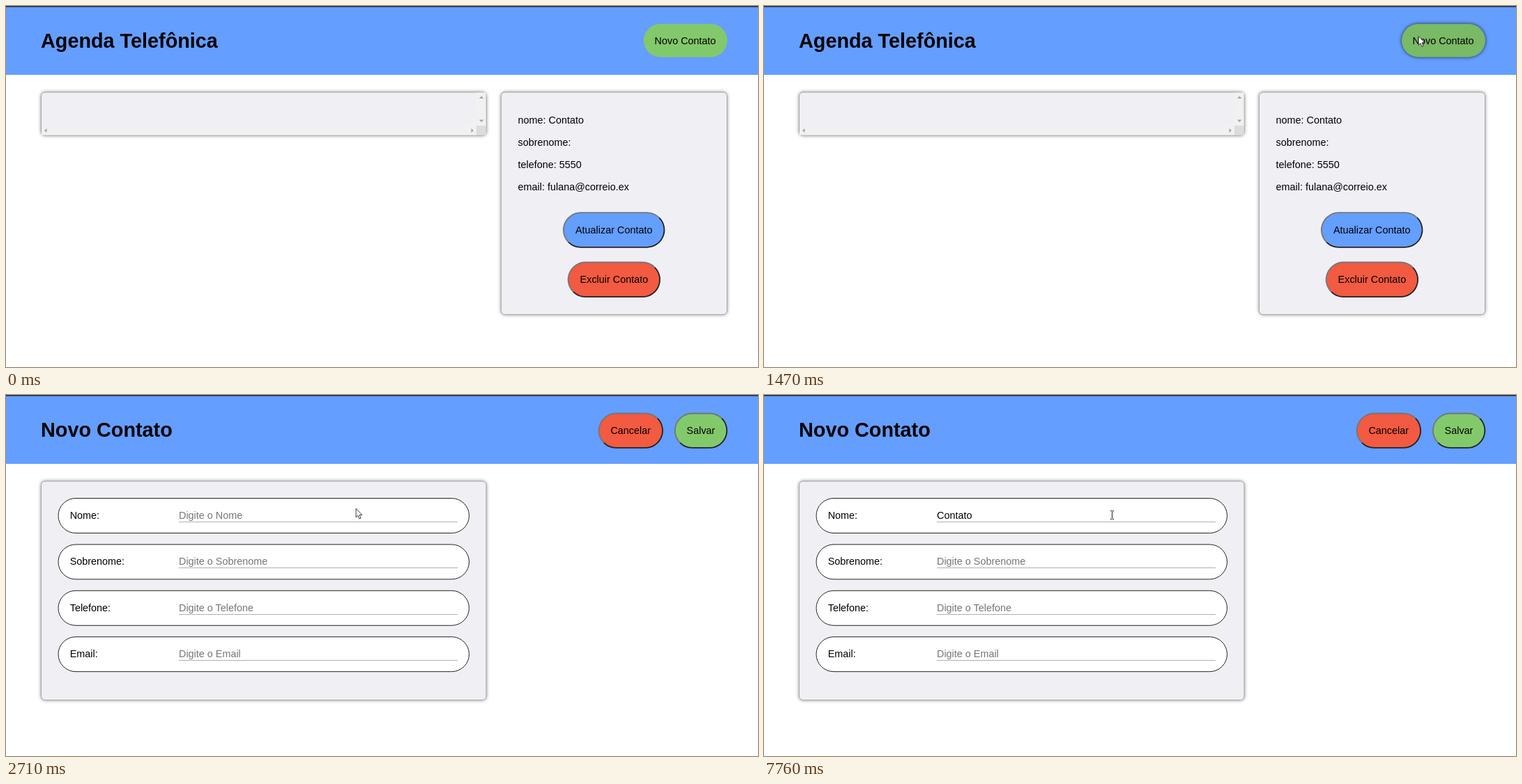
Animation of 1079x519 px, one loop 8 s. Source, as an HTML page:

```html
<!DOCTYPE html>
<html lang="pt">
<head>
<meta charset="utf-8">
<title>Agenda</title>
<style>
html, body { margin: 0; width: 100%; height: 100%; overflow: hidden; background: #fff; }
svg { display: block; width: 1079px; height: 519px; font: 14.4px "Liberation Sans", Arial, sans-serif; }
.title { font-size: 28.8px; font-weight: bold; }
.card { fill: #f0eff4; stroke: #a9a9ab; filter: drop-shadow(0 0 2.5px rgba(0, 0, 0, .45)); }
.hint { fill: #757575; }
.hover { fill: #7ab966; filter: drop-shadow(0 0 2.5px rgba(0, 0, 0, .75)); }
.status { font: 9.2px "Open Sans", "Noto Sans", sans-serif; fill: #fff; }
</style>
</head>
<body>
<svg id="stage" viewBox="0 0 1079 519"></svg>
<script>
const BLUE = '#649eff', GREEN = '#82c96c', RED = '#f25a41';
const LOOP = 8000, SWITCH = 1930;
const FIELDS = ['Nome', 'Sobrenome', 'Telefone', 'Email'];
const WORD = 'Contato';
const KEYS = [4330, 4580, 4880, 5030, 5200, 5350, 5580];
const ENDS = [248, 259, 267, 275, 279, 287, 291, 299];

const text = (x, y, s, attrs = '') => `<text x="${x}" y="${y}" ${attrs}>${s}</text>`;
const rect = (x, y, w, h, attrs) => `<rect x="${x}" y="${y}" width="${w}" height="${h}" ${attrs}/>`;
const card = (x, y, w, h) => rect(x, y, w, h, 'rx="5.5" class="card"');

// Pill with an outset border: light on top and left, dark on bottom and right.
function button(x, y, w, h, fill, label, tx, ty) {
  const r = h / 2 - 0.9, k = r * Math.SQRT1_2;
  const cy = y + h / 2, left = x + h / 2, right = x + w - h / 2;
  const low = `${left - k} ${cy + k}`, high = `${right + k} ${cy - k}`;
  const arc = `A${r} ${r} 0 0 1`;
  const light = `M${low}${arc} ${left} ${cy - r}H${right}${arc} ${high}`;
  const dark = `M${high}${arc} ${right} ${cy + r}H${left}${arc} ${low}`;
  const edge = (d, c) => `<path d="${d}" fill="none" stroke="${c}" stroke-width="1.8"/>`;
  return rect(x + 0.9, y + 0.9, w - 1.8, h - 1.8, `rx="${r}" fill="${fill}"`) +
    edge(light, '#767676') + edge(dark, '#222') + text(tx, ty, label);
}

function listPage() {
  const info = ['nome: Contato', 'sobrenome:', 'telefone: 5550', 'email: fulana@correio.ex'];
  return text(50, 60, 'Agenda Telefônica', 'class="title"') +
    rect(915, 25.8, 120, 47.6, `id="add" rx="23.8" fill="${GREEN}"`) +
    text(930.6, 54.5, 'Novo Contato') +
    card(50.5, 124, 638.5, 62) +
    rect(675, 124.5, 13.5, 48, 'fill="#f1f1f1"') +
    rect(51, 172, 624, 13.5, 'fill="#f1f1f1"') +
    rect(675, 172, 13.5, 13.5, 'fill="#dcdcdc"') +
    '<path d="M679 133h6.400l-3.200-3.500zM679 163.500h6.400l-3.200 3.500zM58.500 176v6l-3.500-3zM667.500 176v6l3.500-3z" fill="#a3a3a3"/>' +
    card(710.5, 124, 324, 319.5) +
    info.map((s, i) => text(734.6, 169 + i * 32, s)).join('') +
    button(799, 296.3, 146.4, 51.4, BLUE, 'Atualizar Contato', 817, 327) +
    button(805.8, 367.6, 133.2, 51.4, RED, 'Excluir Contato', 823.6, 398.4);
}

function formPage() {
  const row = (name, i) => {
    const y = 148.5 + i * 66.4;
    return rect(75, y, 589.5, 50, 'rx="25" fill="#fff" stroke="#222"') +
      text(91.7, y + 29.5, name + ':') +
      text(248, y + 29.5, 'Digite o ' + name, `class="hint" id="in${i}"`) +
      rect(248, Math.round(y + 33.4), 400, 1, 'fill="#b0b0b0"');
  };
  return text(50, 60, 'Novo Contato', 'class="title"') +
    button(849.8, 25.6, 93.2, 51.2, RED, 'Cancelar', 867.4, 56) +
    button(959, 25.6, 76.2, 51.2, GREEN, 'Salvar', 976.6, 56) +
    card(50.5, 124, 638.5, 314.5) + FIELDS.map(row).join('');
}

document.getElementById('stage').innerHTML =
  rect(0, 0, 1079, 519, 'fill="#fff"') +
  rect(0, 0, 1079, 99, `fill="${BLUE}"`) + rect(0, 0, 1079, 1.5, 'fill="#24272e"') +
  `<g id="list">${listPage()}</g><g id="form">${formPage()}</g>` +
  rect(0, 0, 1, 16, 'id="caret" fill="#000"') +
  '<g id="status"><path d="M0 511H119.500Q122 511 122 513.500V519H0z"/>' +
  text(-1.5, 522, 'localhost:3000/contact/new', 'class="status"') + '</g>' +
  '<path id="arrow" d="M.5 .5V13.200L3.400 10.500 5.400 15.300 7.500 14.400 5.500 9.700H9.300z" fill="#fff" stroke="#26262e" stroke-width=".9"/>' +
  '<path id="beam" d="M497 166.500H499M500 166.500H502M499.500 167V178M497 178.500H499M500 178.500H502" fill="none" stroke="#222"/>';

const el = id => document.getElementById(id);
const show = (id, on) => el(id).setAttribute('display', on ? 'inline' : 'none');

// Pointer stops: time, x, y
const PATH = [
  [150, 973, 470], [300, 930, 380], [460, 862, 245], [610, 815, 140], [760, 808, 78],
  [910, 855, 50], [990, 876.5, 45.5], [1220, 917, 45], [1440, 938, 43], [1620, 947, 43],
  [1960, 947, 43], [2160, 850, 66], [2350, 675, 105], [2560, 535, 143],
  [2670, 502, 162.5], [2790, 497, 166]
];

function pointer(t) {
  const step = 76.6;
  const s = Math.max(150, 150 + Math.floor((t - 142) / step) * step);
  const i = PATH.findIndex(p => p[0] > s);
  if (i < 0) return PATH[PATH.length - 1].slice(1);
  const a = PATH[i - 1], b = PATH[i], f = (s - a[0]) / (b[0] - a[0]);
  return [a[1] + (b[1] - a[1]) * f, a[2] + (b[2] - a[2]) * f];
}

const within = (t, a, b) => t >= a && t < b;

function draw(t) {
  const [x, y] = pointer(t), form = t >= SWITCH;
  show('list', !form);
  show('form', form);
  show('status', within(t, 1790, 2410));
  show('arrow', within(t, 150, 2790));
  show('beam', t >= 2790);
  el('arrow').setAttribute('transform', `translate(${x} ${y})`);
  el('add').setAttribute('class', t >= 150 && x >= 915 && y < 74 ? 'hover' : '');

  const n = KEYS.filter(k => t >= k).length;
  const name = el('in0');
  name.textContent = n ? WORD.slice(0, n) : 'Digite o Nome';
  name.setAttribute('class', n ? '' : 'hint');

  const second = t >= 6200;
  show('caret', within(t, 3010, 3470) || within(t, 4030, 6130) ||
    within(t, 6200, 6750) || within(t, 7230, 7760));
  el('caret').setAttribute('x', second ? 248 : ENDS[n]);
  el('caret').setAttribute('y', second ? 232 : n ? 165 : 166);
}

const start = performance.now();
function tick() {
  draw((performance.now() - start) % LOOP);
  requestAnimationFrame(tick);
}
draw(0);
requestAnimationFrame(tick);
</script>
</body>
</html>
```
